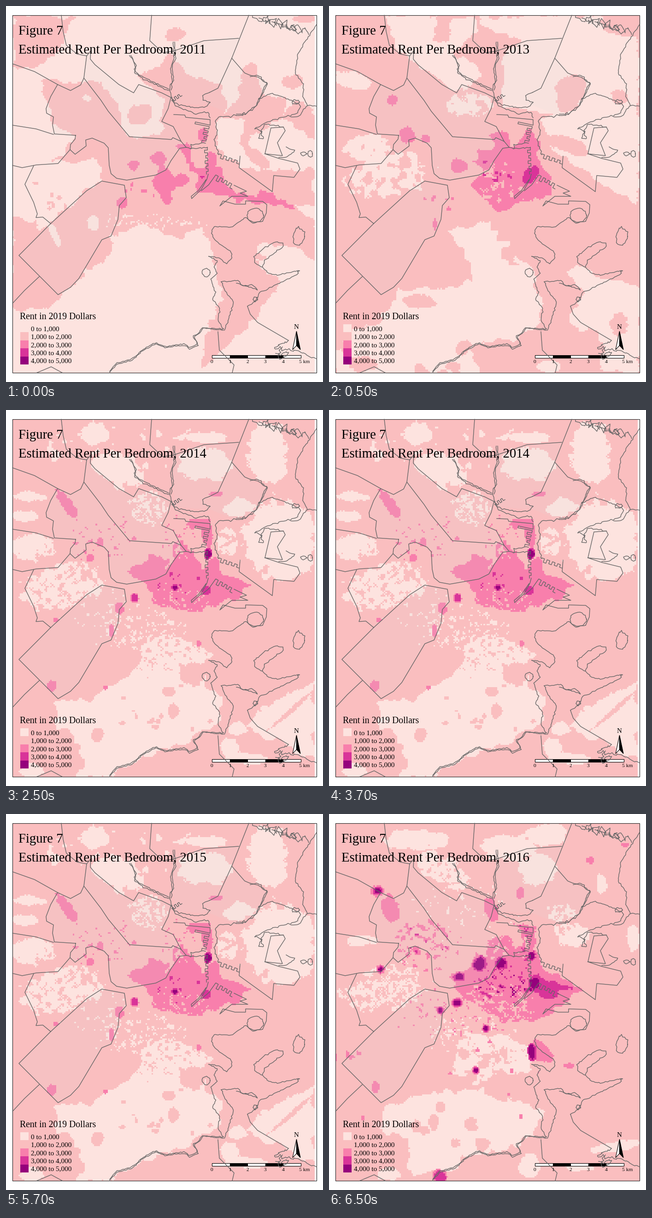
A matplotlib script that plays this animation: 688 by 814 pixels, repeating every 8 s.

```python
import numpy as np
import matplotlib.pyplot as plt
from matplotlib.animation import FuncAnimation
from matplotlib.colors import ListedColormap
from matplotlib.patches import Polygon, Rectangle
from matplotlib.path import Path

WIDTH, HEIGHT, DPI = 688, 814, 100
LEFT, TOP, RIGHT, BOTTOM = 14, 20, 674, 794
COLORS = ['#fde3df', '#fabebf', '#f87fac', '#d93499', '#95017c']
COLS, ROWS = 200, 236
X, Y = np.meshgrid(LEFT + (np.arange(COLS) + .5) * 660 / COLS,
                   TOP + (np.arange(ROWS) + .5) * 774 / ROWS)
CORE, WEST, RIVERSIDE, SOUTH = (375, 375), (120, 370), (215, 280), (330, 520)


class Rents:
    """Grid of rent classes painted from ragged patches and random specks."""

    def __init__(self, base, seed):
        self.rng = np.random.default_rng(seed)
        self.grid = np.full((ROWS, COLS), base)
        self.wave_x, self.wave_y, self.fine = self.noise(9), self.noise(9), self.noise(1)

    def noise(self, passes):
        n = self.rng.random((ROWS, COLS))
        for _ in range(passes):
            n = (n + sum(np.roll(n, s, a) for s in (1, -1) for a in (0, 1))) / 5
        return (n - n.mean()) / n.std()

    def area(self, level, *xy):
        pts = np.column_stack([(X + 3.5 * self.wave_x + self.fine).ravel(),
                               (Y + 3.5 * self.wave_y + self.fine).ravel()])
        self.grid[Path(np.reshape(xy, (-1, 2))).contains_points(pts).reshape(X.shape)] = level

    def patch(self, level, x, y, rx, ry, tilt=0):
        c, s = np.cos(np.radians(tilt)), np.sin(np.radians(tilt))
        u, v = (X - x) * c + (Y - y) * s, (Y - y) * c - (X - x) * s
        r = (u / rx) ** 2 + (v / ry) ** 2
        self.grid[r + .2 * self.wave_x + .1 * self.fine < 1] = level

    def peak(self, x, y, r, low, high, stretch=1.1):
        """Nested rings that rise from one class to another."""
        for i, level in enumerate(range(low, high + 1)):
            self.patch(level, x, y, r * (1 - .25 * i), r * stretch * (1 - .25 * i))

    def specks(self, old, new, center, rx, ry, share, passes=1):
        """Turn a random share of one class near a center into another."""
        n = self.noise(passes)
        r = ((X - center[0]) / rx) ** 2 + ((Y - center[1]) / ry) ** 2
        limit = np.quantile(n, 1 - share)
        self.grid[(self.grid == old) & (n > limit + 2 * np.maximum(0, r - .5))] = new

    def scatter(self, level, center, spread, count, size=4):
        for x, y in self.rng.normal(center, spread, (count, 2)):
            self.patch(level, x, y, *self.rng.uniform(.6, 1.4, 2) * size)


def rent_2011():
    r = Rents(0, 11)
    r.area(1, 14, 20, 150, 20, 127, 72, 112, 100, 58, 135, 14, 128)
    r.area(1, 75, 160, 200, 165, 240, 210, 265, 283, 338, 280, 345, 200, 285, 155, 360, 100,
           400, 150, 475, 170, 483, 215, 462, 250, 462, 310, 525, 355, 674, 355, 674, 553,
           615, 515, 545, 553, 602, 600, 535, 685, 433, 787, 432, 715, 470, 630, 445, 520,
           430, 478, 380, 505, 300, 468, 235, 500, 232, 530, 170, 575, 95, 655, 14, 662,
           14, 455, 85, 480, 215, 370, 205, 330, 105, 345, 150, 285, 100, 250)
    r.area(1, 518, 130, 546, 130, 565, 192, 615, 200, 600, 240, 530, 290, 577, 352, 555, 355,
           510, 300, 522, 250, 470, 240, 510, 200)
    r.area(1, 600, 235, 640, 202, 674, 225, 674, 290)
    r.patch(1, 292, 235, 28, 20, -30)
    r.patch(1, 368, 62, 21, 15)
    r.patch(1, 625, 165, 20, 15)
    r.patch(1, 650, 28, 25, 8)
    r.patch(0, 176, 200, 11, 9)
    r.patch(0, 192, 470, 12, 18)
    r.patch(0, 104, 490, 8, 30, -25)
    r.patch(0, 580, 530, 35, 13, 15)
    r.area(0, 628, 432, 674, 470, 674, 432)
    r.scatter(1, (120, 420), (30, 20), 8, 5)
    r.specks(1, 0, (310, 468), 120, 20, .15)
    r.area(2, 368, 308, 400, 300, 406, 342, 436, 350, 442, 318, 460, 338, 480, 377, 500, 400,
           580, 405, 632, 442, 530, 422, 412, 400, 416, 365)
    r.patch(2, 344, 380, 21, 30)
    r.patch(2, 350, 410, 12, 18)
    r.patch(2, 383, 377, 17, 14)
    r.patch(2, 332, 332, 16, 14)
    r.patch(2, 278, 344, 12, 11)
    r.patch(2, 254, 428, 12, 12)
    r.patch(2, 430, 280, 11, 15)
    r.scatter(2, (290, 395), (20, 15), 5)
    r.patch(3, 430, 370, 5, 3)
    return r.grid


def rent_2013():
    r = Rents(1, 13)
    r.area(0, 120, 20, 235, 20, 230, 85, 260, 75, 262, 30, 318, 20, 318, 62, 270, 100,
           335, 150, 277, 187, 160, 107)
    r.area(0, 375, 110, 415, 75, 330, 40, 330, 20, 588, 20, 600, 60, 674, 75, 674, 432,
           565, 365, 480, 310, 458, 250, 500, 235, 375, 215)
    r.patch(1, 522, 190, 28, 42, 15)
    r.patch(1, 515, 300, 48, 17, 18)
    r.patch(1, 630, 195, 17, 18)
    r.patch(1, 635, 38, 42, 20)
    r.patch(0, 50, 160, 42, 18, 15)
    r.patch(0, 85, 310, 50, 28)
    r.patch(0, 125, 365, 85, 48, -15)
    r.specks(0, 1, WEST, 110, 80, .28, 4)
    r.patch(0, 305, 215, 50, 24)
    r.specks(0, 1, (305, 215), 60, 35, .18, 3)
    r.area(0, 255, 490, 350, 470, 365, 500, 395, 512, 372, 545, 435, 560, 452, 620, 465, 650,
           455, 690, 400, 725, 340, 720, 300, 745, 330, 794, 14, 794, 14, 750, 50, 700,
           110, 690, 150, 610, 275, 612, 310, 588, 295, 530)
    r.patch(1, 195, 640, 35, 15)
    r.patch(1, 75, 775, 30, 17)
    r.patch(1, 268, 555, 10, 20)
    r.scatter(1, (200, 740), (90, 30), 7, 12)
    r.area(0, 515, 575, 550, 560, 590, 592, 674, 605, 674, 794, 590, 794, 600, 740, 540, 650, 555, 620)
    r.patch(0, 555, 675, 28, 28)
    r.patch(0, 480, 780, 30, 12)
    r.patch(1, 630, 690, 20, 25)
    r.area(2, 352, 278, 388, 272, 390, 300, 412, 300, 420, 272, 446, 268, 456, 320, 472, 350,
           490, 410, 412, 428, 370, 446, 305, 388, 345, 352, 315, 338, 318, 318, 355, 315)
    r.specks(2, 1, (360, 385), 75, 55, .15, 2)
    r.patch(2, 138, 203, 10, 11)
    r.patch(2, 170, 280, 17, 17)
    r.patch(2, 209, 288, 10, 11)
    r.patch(2, 281, 346, 18, 15)
    r.patch(2, 230, 472, 4, 14)
    r.scatter(2, (255, 420), (25, 10), 6)
    r.patch(3, 438, 366, 24, 12, -45)
    r.scatter(3, CORE, (28, 18), 9, 3.5)
    return r.grid


def rent_2014():
    r = Rents(1, 14)
    r.patch(0, 195, 48, 32, 26)
    r.patch(0, 245, 128, 58, 36, 25)
    r.patch(0, 435, 118, 58, 34)
    r.patch(0, 430, 60, 55, 12)
    r.patch(0, 570, 95, 45, 62)
    r.patch(0, 598, 280, 78, 85)
    r.patch(0, 508, 212, 34, 20)
    r.patch(0, 310, 215, 38, 38)
    r.patch(0, 485, 285, 22, 32)
    r.patch(0, 55, 295, 55, 30)
    r.patch(0, 48, 188, 38, 11)
    r.patch(0, 40, 230, 26, 12)
    r.patch(0, 120, 380, 85, 45, -15)
    r.specks(0, 1, WEST, 110, 80, .32, 2)
    r.specks(0, 1, (310, 215), 50, 50, .5)
    r.specks(0, 1, (485, 285), 28, 38, .45, 2)
    r.specks(1, 0, (250, 80), 250, 60, .05, 5)
    r.area(0, 350, 485, 395, 495, 450, 530, 425, 558, 442, 600, 470, 620, 465, 680, 415, 710,
           345, 735, 240, 775, 225, 794, 150, 794, 172, 760, 150, 700, 110, 690, 105, 630,
           175, 625, 235, 600, 288, 560, 300, 510)
    r.patch(1, 408, 572, 24, 28)
    r.patch(1, 365, 652, 12, 14)
    r.patch(1, 355, 610, 14, 10)
    r.patch(1, 200, 705, 14, 18)
    r.scatter(1, (320, 660), (80, 50), 16, 5)
    r.area(0, 522, 690, 560, 645, 674, 585, 674, 755, 610, 725)
    r.patch(0, 505, 690, 20, 15)
    r.patch(0, 525, 755, 40, 14)
    r.patch(0, 490, 730, 18, 22)
    r.patch(0, 55, 780, 30, 14)
    for k in range(4):
        r.patch(1, 600 + 18 * k, 672 - 17 * k, 42, 2.5, -36)
    r.specks(1, 0, (290, 480), 110, 50, .17)
    r.specks(0, 1, SOUTH, 100, 60, .16)
    r.specks(1, 0, (190, 420), 100, 60, .06)
    r.area(2, 265, 345, 320, 318, 347, 317, 352, 345, 360, 325, 357, 290, 385, 283, 412, 318,
           425, 340, 455, 325, 480, 355, 535, 382, 485, 415, 440, 432, 400, 448, 330, 415, 300, 372)
    r.area(2, 398, 232, 445, 240, 451, 275, 440, 300, 425, 262, 402, 255)
    r.patch(2, 132, 203, 35, 11, 55)
    r.specks(2, 1, (360, 415), 80, 40, .2)
    r.specks(2, 1, (390, 295), 45, 30, .2)
    r.specks(1, 2, RIVERSIDE, 80, 60, .05)
    r.specks(1, 2, (385, 275), 55, 50, .09)
    r.patch(2, 205, 285, 9, 11)
    r.patch(2, 184, 320, 9, 9)
    r.patch(2, 248, 430, 11, 14)
    r.patch(2, 100, 598, 10, 13)
    r.patch(2, 230, 478, 5, 12)
    r.patch(2, 460, 182, 13, 6)
    for x, y in ((109, 455), (216, 601), (420, 506)):
        r.patch(2, x, y, 6, 6)
    r.specks(2, 3, CORE, 60, 35, .05)
    r.peak(281, 407, 9, 2, 3)
    r.peak(368, 384, 7, 3, 4)
    r.peak(437, 390, 9, 3, 3)
    r.peak(441, 312, 9, 3, 4, 1.4)
    return r.grid


def rent_2016():
    r = Rents(1, 16)
    r.patch(0, 190, 55, 65, 22)
    r.patch(0, 245, 122, 58, 32, 25)
    r.patch(0, 390, 72, 60, 28)
    r.patch(0, 475, 45, 48, 25)
    r.patch(0, 455, 120, 38, 32)
    r.patch(0, 525, 262, 38, 26)
    r.patch(0, 592, 150, 11, 22)
    r.patch(0, 660, 270, 14, 28)
    r.patch(0, 70, 275, 35, 11)
    r.patch(0, 120, 375, 85, 45, -15)
    r.patch(0, 500, 215, 35, 18)
    r.specks(0, 1, WEST, 110, 80, .5)
    r.specks(0, 1, (250, 120), 90, 50, .2, 2)
    r.specks(0, 1, (500, 220), 60, 35, .4, 2)
    r.area(0, 278, 505, 300, 475, 365, 478, 440, 510, 440, 560, 370, 560, 330, 580, 272, 565)
    r.area(0, 185, 610, 330, 590, 360, 622, 420, 620, 470, 650, 450, 692, 400, 720, 290, 750,
           260, 775, 180, 780, 170, 700, 110, 682, 118, 640)
    r.scatter(1, (300, 680), (70, 35), 9, 13)
    r.scatter(1, (370, 525), (40, 18), 6, 9)
    r.specks(0, 1, SOUTH, 100, 60, .15, 2)
    r.specks(1, 0, (310, 480), 100, 45, .13)
    r.specks(1, 0, (300, 210), 140, 80, .025)
    r.patch(0, 130, 780, 24, 14)
    r.patch(0, 435, 762, 22, 28)
    r.patch(0, 620, 720, 52, 11, -10)
    r.patch(0, 545, 765, 30, 8)
    r.area(2, 268, 370, 318, 308, 345, 305, 345, 272, 385, 268, 402, 288, 425, 278, 398, 235,
           446, 242, 452, 300, 466, 335, 549, 382, 465, 440, 390, 450, 310, 405)
    r.patch(2, 134, 205, 18, 33, -15)
    r.patch(2, 352, 205, 14, 28, -15)
    r.area(2, 446, 495, 470, 500, 490, 520, 482, 537, 446, 535)
    r.specks(2, 1, (360, 415), 95, 45, .25)
    r.specks(2, 1, (380, 280), 55, 40, .25)
    r.specks(1, 2, RIVERSIDE, 70, 50, .28, 2)
    r.specks(1, 2, (280, 435), 150, 60, .05)
    r.scatter(2, (45, 520), (22, 8), 7, 6)
    r.scatter(2, (350, 580), (120, 80), 9, 4)
    r.patch(2, 415, 175, 10, 14)
    r.patch(2, 100, 590, 9, 14)
    r.patch(2, 522, 545, 12, 5)
    r.patch(2, 568, 100, 8, 7)
    r.patch(2, 643, 67, 8, 6)
    r.area(3, 425, 382, 450, 345, 500, 375, 535, 376, 490, 402)
    r.specks(2, 3, (380, 365), 80, 50, .17)
    r.specks(2, 3, RIVERSIDE, 60, 40, .1)
    r.specks(2, 3, (430, 280), 25, 50, .2)
    r.peak(328, 325, 15, 3, 4)
    r.peak(372, 322, 13, 3, 4)
    r.peak(283, 352, 17, 2, 4, .8)
    r.peak(278, 409, 13, 2, 4, .8)
    r.peak(448, 367, 14, 3, 4)
    r.peak(441, 514, 11, 3, 4, 1.9)
    r.peak(440, 308, 8, 3, 4, 1.5)
    r.peak(105, 167, 15, 2, 4, .8)
    r.peak(240, 788, 16, 2, 3)
    for x, y in ((112, 335), (242, 426), (319, 555), (340, 465)):
        r.peak(x, y, 9, 2, 4)
    r.specks(3, 4, CORE, 70, 35, .25)
    return r.grid


fig = plt.figure(figsize=(WIDTH / DPI, HEIGHT / DPI), dpi=DPI, facecolor='white')
ax = fig.add_axes([0, 0, 1, 1])
shared = rent_2014()
YEARS = [(2011, rent_2011(), 670), (2013, rent_2013(), 674), (2014, shared, 670),
         (2015, shared, 670), (2016, rent_2016(), 674)]
raster = ax.imshow(shared, cmap=ListedColormap(COLORS), vmin=0, vmax=4, aspect='auto',
                   interpolation='nearest', extent=(LEFT, RIGHT, BOTTOM, TOP))
ax.set(xlim=(0, WIDTH), ylim=(HEIGHT, 0))
ax.axis('off')
shore_rng = np.random.default_rng(5)


def line(*xy):
    x, y = np.reshape(xy, (-1, 2)).T
    ax.plot(x, y, color='#666666', lw=1, solid_joinstyle='round')


def coast(*xy, amp=1.0, step=4):
    """Polyline roughened like a shoreline."""
    p = np.reshape(xy, (-1, 2)).astype(float)
    d = np.r_[0, np.cumsum(np.hypot(*np.diff(p, axis=0).T))]
    s = np.linspace(0, d[-1], max(3, int(d[-1] / step)))
    q = np.column_stack([np.interp(s, d, p[:, 0]), np.interp(s, d, p[:, 1])])
    q[1:-1] += shore_rng.normal(0, amp, q[1:-1].shape)
    line(*q.ravel())


def islet(x, y, rx, ry, amp=.6):
    a = np.linspace(0, 2 * np.pi, 24)
    coast(*np.column_stack([x + rx * np.cos(a), y + ry * np.sin(a)]).ravel(), amp=amp)


def piers(x0, y0, x1, y1, n, depth):
    """Square teeth of uneven length along a quay."""
    t = np.repeat(np.linspace(0, 1, 2 * n + 1), 2)[1:-1]
    off = np.tile([0, 0, 1, 1], n) * np.repeat(shore_rng.uniform(.6, 1.2, n) * depth, 4)
    dx, dy = x1 - x0, y1 - y0
    size = np.hypot(dx, dy)
    line(*np.column_stack([x0 + dx * t - dy / size * off, y0 + dy * t + dx / size * off]).ravel())


def tint(*xy):
    ax.add_patch(Polygon(np.reshape(xy, (-1, 2)), fc='#dcdcdc', alpha=.12, lw=0))


def draw_towns():
    southwest = (97, 471, 175, 400, 208, 379, 257, 388, 261, 415, 246, 432, 243, 462,
                 228, 498, 208, 506, 158, 590, 140, 609, 113, 625, 28, 540, 97, 471)
    river = (151, 280, 150, 288, 140, 300, 139, 311, 150, 321, 174, 303, 173, 290, 187, 286,
             213, 297, 222, 307, 224, 345, 228, 363, 240, 373, 262, 377, 325, 366, 347, 355,
             358, 335, 377, 308, 391, 306)
    inland = (380, 293, 362, 285, 359, 289, 268, 283, 222, 228, 206, 204, 169, 156, 162, 171,
              140, 183, 112, 170, 97, 196, 87, 222, 88, 232, 103, 240, 101, 258, 105, 277, 151, 280)
    north = (169, 156, 175, 108, 184, 97, 183, 115, 193, 127, 245, 170, 277, 188, 288, 170,
             338, 188, 358, 198, 352, 222, 338, 250, 363, 261, 380, 293)
    for shape in (southwest, river + inland):
        tint(*shape)
        line(*shape)
    tint(*north, 359, 289, 268, 283, 206, 204)
    tint(362, 100, 430, 76, 505, 70, 490, 113, 460, 178, 430, 190, 430, 215, 368, 210, 360, 150)
    tint(490, 113, 520, 148, 568, 168, 545, 215, 500, 238, 430, 210, 430, 190, 460, 178)
    line(*north)
    line(120, 20, 124, 55, 131, 85, 154, 104, 175, 108)
    line(14, 125, 62, 142, 112, 170)
    line(14, 258, 65, 266, 103, 278)
    line(139, 311, 113, 341, 66, 344, 35, 350, 14, 345)
    line(60, 346, 41, 386, 60, 425, 68, 450, 65, 458, 80, 457, 97, 471)
    line(14, 644, 40, 616, 72, 586)
    line(316, 20, 312, 75, 340, 101, 362, 98, 430, 75, 505, 70)
    line(527, 20, 490, 113, 460, 178, 442, 187)
    line(490, 113, 518, 145, 530, 150)
    line(460, 705, 463, 745, 495, 777, 491, 794)
    line(67, 794, 98, 781, 122, 794)


def draw_inner_harbor():
    for s in (0, 3):
        coast(363 + s, 78, 365 + s, 115, 358 + s, 132, 361 + s, 160, 355 + s, 182)
        coast(268 + s, 107, 281, 127 + s, 278, 140 + s, 292, 152 + s, 332, 170 + s, 353, 180 + s)
        coast(472, 699 + s, 425 + s, 697, 418 + s, 708, 405 + s, 715, 417, 732 + s, 398, 740 + s,
              388, 731 + s, 345, 737 + s, 325, 729 + s, 300, 741 + s, 272, 765 + s, 240, 773 + s,
              225, 791 + s, amp=.6)
        coast(530, 150 + s, 548, 150 + s, 568 - s, 168, 545 - s, 215, 520, 235 - s, 500, 237 - s)
    coast(355, 182, 362, 206, 372, 213, 420, 222, 438, 216, 443, 208, 428, 205, 427, 192, 442, 187)
    coast(358, 198, 366, 215, 410, 233, 438, 230, 443, 242)
    piers(382, 194, 362, 208, 3, 6)
    line(364, 235, 388, 236, 390, 241, 443, 246, 443, 258, 411, 251, 410, 255, 441, 261)
    piers(441, 262, 433, 297, 4, 9)
    coast(433, 297, 402, 300, 401, 309, 391, 306)
    coast(401, 309, 437, 306)
    piers(437, 306, 439, 364, 5, 6)
    line(439, 364, 436, 375, 424, 397, 403, 417, 402, 412, 418, 399, 434, 376)
    line(424, 400, 440, 387, 455, 366)
    piers(456, 366, 495, 388, 4, 11)
    line(495, 388, 522, 401, 508, 405, 525, 412, 490, 412, 464, 433, 471, 422, 497, 429,
         520, 429, 520, 422, 557, 423, 566, 430, 565, 448, 557, 466)
    islet(541, 453, 18, 15)


def draw_east():
    coast(500, 237, 462, 241, 453, 248, 459, 270, 452, 290, 462, 322)
    piers(462, 320, 508, 337, 4, 9)
    line(508, 325, 506, 350, 578, 402, 581, 367, 625, 371, 638, 353, 633, 340, 592, 330,
         562, 320, 575, 264, 602, 262, 606, 270, 589, 296, 600, 324, 562, 320)
    coast(592, 328, 612, 326, 626, 313, 608, 305)
    coast(602, 262, 562, 255, 553, 270, 560, 288, 549, 286, 556, 270, 540, 266)
    coast(548, 202, 575, 188, 625, 206, 640, 215, 632, 232, 575, 248, 540, 266)
    coast(618, 240, 635, 238, 654, 215, 674, 217)
    coast(674, 40, 646, 82, 633, 106, 627, 145, 646, 170, 644, 195, 654, 215, amp=.7)
    islet(628, 208, 9, 5, 1.5)
    for k in range(7):  # tangled marsh creeks
        x, y = 535 + 14 * k, 22 + 4 * k
        coast(x, y, x + 18, y + 12, x + 30, y, x + 38, y + 16, amp=2.5)


def draw_south_shore():
    coast(557, 466, 535, 470, 520, 457, 490, 479, 450, 478, 446, 492, 455, 509, 488, 531,
          491, 545, 478, 558, 463, 545, 440, 542, amp=.5)
    coast(440, 542, 460, 552, 452, 565, 458, 580, 443, 592, 455, 618, 449, 636, 464, 655,
          460, 680, 472, 699)
    islet(434, 577, 9, 9)
    coast(467, 597, 475, 616, 494, 642, 486, 668, 474, 702)
    coast(467, 597, 503, 594, 515, 606, 532, 602, 546, 614, 500, 600)
    coast(556, 565, 540, 556, 538, 542, 580, 511, 601, 512, 600, 522, 562, 550, 556, 565,
          568, 578, 590, 583, 637, 572, 633, 581, 550, 621, 540, 640, 524, 650, amp=.9)
    islet(541, 636, 5, 5, 1.5)
    line(524, 650, 530, 667, 546, 685, 613, 724)
    coast(613, 724, 580, 740, 632, 747, 674, 764, amp=1.8)
    coast(585, 752, 612, 752, 590, 765, 600, 738, amp=2)
    islet(636, 499, 12, 20, 1.2)
    islet(646, 320, 7, 4)
    islet(660, 320, 5, 7)


def text(x, y, s, px, **kw):
    return ax.text(x, y, s, fontsize=px * 72 / DPI, family='Liberation Serif', **kw)


def draw_furniture():
    ax.add_patch(Rectangle((LEFT, TOP), RIGHT - LEFT, BOTTOM - TOP, fill=False, ec='#222222', lw=.8))
    text(27, 62, 'Figure 7', 28.7)
    text(30, 678, 'Rent in 2019 Dollars', 19.8)
    for i, color in enumerate(COLORS):
        y = 689 + 17.4 * i
        ax.add_patch(Rectangle((31, y), 18, 17.4, fc=color, lw=0))
        low = f'{i},000' if i else '0'
        text(54, y + 14, f'{low} to {i + 1},000', 15.2)
    seg = 193 / 5
    for i in range(5):
        x = 447 + seg * i
        ax.add_patch(Rectangle((x, 756), seg, 6, fc='black' if i % 2 else 'white', ec='black', lw=.8))
        text(x, 773, str(i), 11.5, ha='center')
    text(636, 773, '5 km', 11.5)
    text(630, 699, 'N', 15, ha='center')
    for x, color in ((622, 'white'), (639, 'black')):
        ax.add_patch(Polygon([(630.5, 704), (x, 744), (630.5, 735)], fc=color, ec='black', lw=.8))


draw_towns()
draw_inner_harbor()
draw_east()
draw_south_shore()
draw_furniture()
title = text(27, 102, '', 28.7)
STARTS = [0, 1, 5, 9, 13]  # in steps of 500 ms


def update(step):
    year, grid, right = YEARS[np.searchsorted(STARTS, step, side='right') - 1]
    raster.set_data(grid)
    raster.set_extent((LEFT, right, BOTTOM, TOP))
    title.set_text(f'Estimated Rent Per Bedroom, {year}')
    return raster, title


anim = FuncAnimation(fig, update, frames=16, interval=500, repeat=True, repeat_delay=0)
plt.show()
```
